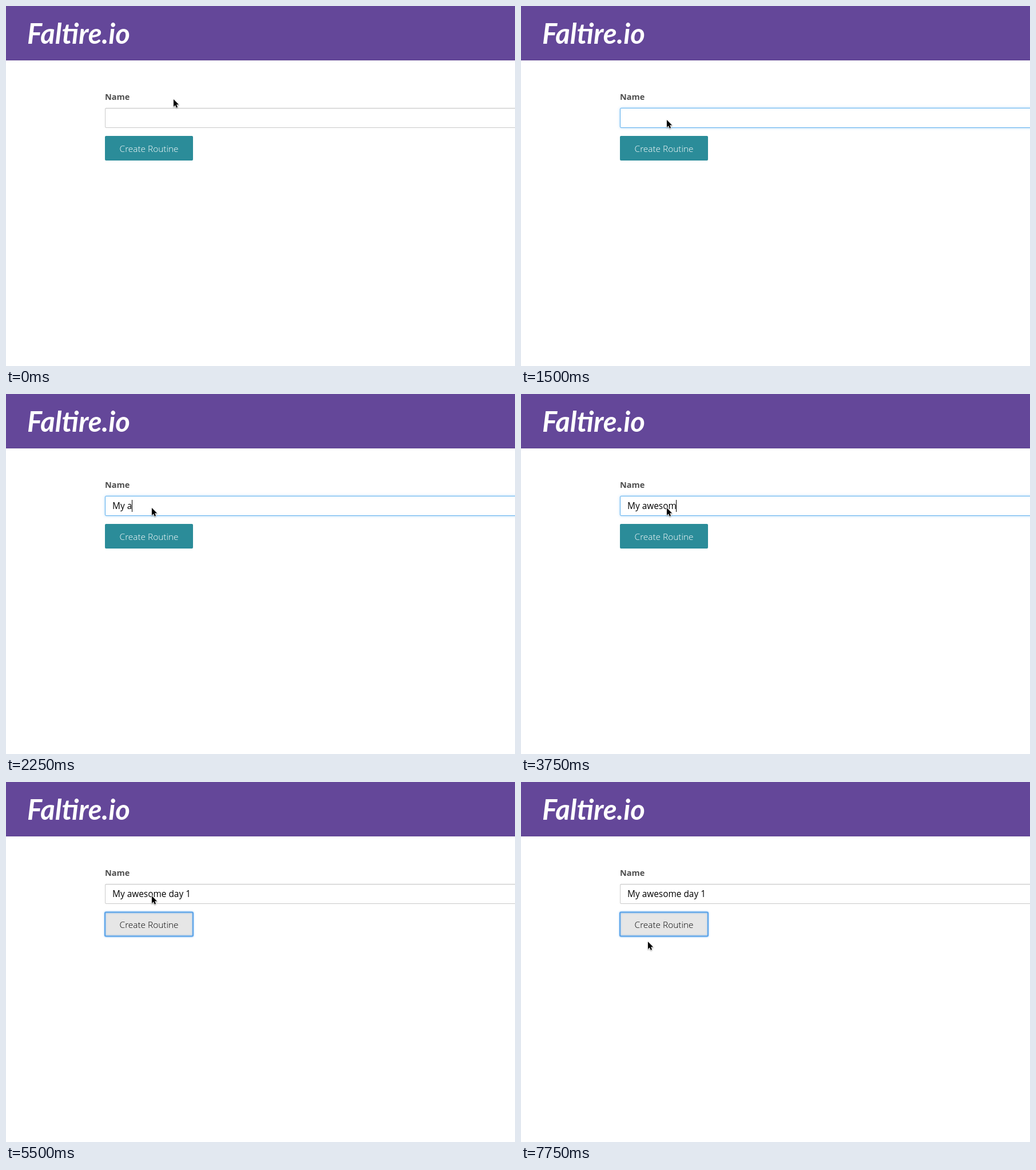
Animation of 890x629 px, one loop 8 s. Source, as an HTML page with a canvas:

```html
<!DOCTYPE html>
<html lang="en">
<head>
<meta charset="utf-8">
<title>Create a routine</title>
<style>
html, body { margin: 0; width: 100%; height: 100%; overflow: hidden; background: #fff; }
canvas { display: block; }
</style>
</head>
<body>
<canvas id="stage" width="890" height="629"></canvas>
<script>
const ctx = document.getElementById('stage').getContext('2d');
const W = 890, H = 629, LOOP = 8000, TICK = 250;
const SANS = '"Open Sans", "Noto Sans", sans-serif';
const PHRASE = 'My awesome day 1';
const FOCUS_INPUT = 1250, TYPE_START = 1750, TYPE_END = 5000, FOCUS_BUTTON = 5250;

// Pointer rests as [start ms, x, y]; each holds until the next.
const rests = [
  [0, 293, 163], [250, 274, 188], [1000, 255, 199], [5750, 299, 389],
  [6000, 338, 352], [6250, 357, 342], [7000, 435, 331], [7250, 468, 319], [7750, 222, 279]
];

// Steady typing with a slower stretch in the middle.
function typedCount(t) {
  if (t < TYPE_START) return 0;
  const u = Math.min(1, (t - TYPE_START) / (TYPE_END - TYPE_START));
  return Math.floor(1 + (PHRASE.length - 1) * u + 1.33 * Math.sin(3 * Math.PI * u));
}

function text(str, x, y, font, color) {
  ctx.font = font;
  ctx.fillStyle = color;
  ctx.fillText(str, x, y);
}

function box(x, y, w, h, r) {
  ctx.beginPath();
  ctx.roundRect(x, y, w, h, r);
}

function glow(color, blur, draw) {
  ctx.save();
  ctx.shadowColor = color;
  ctx.shadowBlur = blur;
  draw();
  ctx.restore();
}

function drawHeader() {
  ctx.fillStyle = '#644799';
  ctx.fillRect(0, 0, W, 95);
  ctx.fillStyle = '#5c4090';
  ctx.fillRect(0, 94, W, 1);
  ctx.fillStyle = '#f6f5f8';
  ctx.fillRect(0, 95, W, 1);
  text('Faltire.io', 37, 66, 'italic 700 49px Lato, sans-serif', '#fff');
}

function drawInput(t, active) {
  text('Name', 173, 164, '700 14.5px ' + SANS, '#4d4d4d');
  box(173.5, 178.5, W, 34, 1.5);
  ctx.fillStyle = '#fff';
  if (active) glow('rgba(90,175,240,.6)', 5, () => ctx.fill());
  ctx.fill();
  ctx.lineWidth = 1;
  ctx.strokeStyle = active ? '#5fb0ee' : '#cacaca';
  ctx.stroke();
  if (!active) {
    ctx.fillStyle = 'rgba(10,10,10,.06)';
    ctx.fillRect(174, 179, W, 1);
  }

  const str = PHRASE.slice(0, typedCount(t));
  text(str, 186, 201, '400 15.4px ' + SANS, '#000');
  const blinkOff = !str && t >= FOCUS_INPUT + TICK;
  if (active && !blinkOff) {
    ctx.fillRect(Math.floor(186 + ctx.measureText(str).width), 185, 1, 21);
  }
}

function drawButton(t, active) {
  const fading = t < FOCUS_BUTTON + TICK;
  box(173, 227, 154, 43, 2);
  ctx.fillStyle = !active ? '#2b8c99' : fading ? '#8bbac0' : '#e6e6e6';
  ctx.fill();
  if (active) {
    box(173, 227.5, 154, 42, 2);
    ctx.lineWidth = 2;
    ctx.strokeStyle = '#5ba3e8';
    glow('rgba(80,160,240,.8)', 3, () => ctx.stroke());
  }
  ctx.textAlign = 'center';
  text('Create Routine', 250, 254.5, '300 15.4px ' + SANS, active ? '#000' : '#fff');
  ctx.textAlign = 'left';
}

function drawPointer(t) {
  const [, x, y] = rests.findLast(([start]) => t >= start);
  const arrow = new Path2D('M0 0V13.6L3.1 10.7L5.1 15.4L7.4 14.4L5.4 9.8H9.6Z');
  ctx.save();
  ctx.translate(x, y);
  ctx.scale(0.95, 0.95);
  ctx.lineWidth = 1.6;
  ctx.lineJoin = 'round';
  ctx.strokeStyle = '#fff';
  ctx.shadowOffsetY = 1;
  glow('rgba(0,0,0,.4)', 2, () => ctx.stroke(arrow));
  ctx.fillStyle = '#000';
  ctx.fill(arrow);
  ctx.restore();
}

function frame(now) {
  const t = Math.floor((now % LOOP) / TICK) * TICK;
  const onButton = t >= FOCUS_BUTTON;
  ctx.fillStyle = '#fff';
  ctx.fillRect(0, 0, W, H);
  drawHeader();
  drawInput(t, t >= FOCUS_INPUT && !onButton);
  drawButton(t, onButton);
  drawPointer(t);
}

const begin = performance.now();
(function tick() {
  frame(performance.now() - begin);
  requestAnimationFrame(tick);
})();
</script>
</body>
</html>
```
